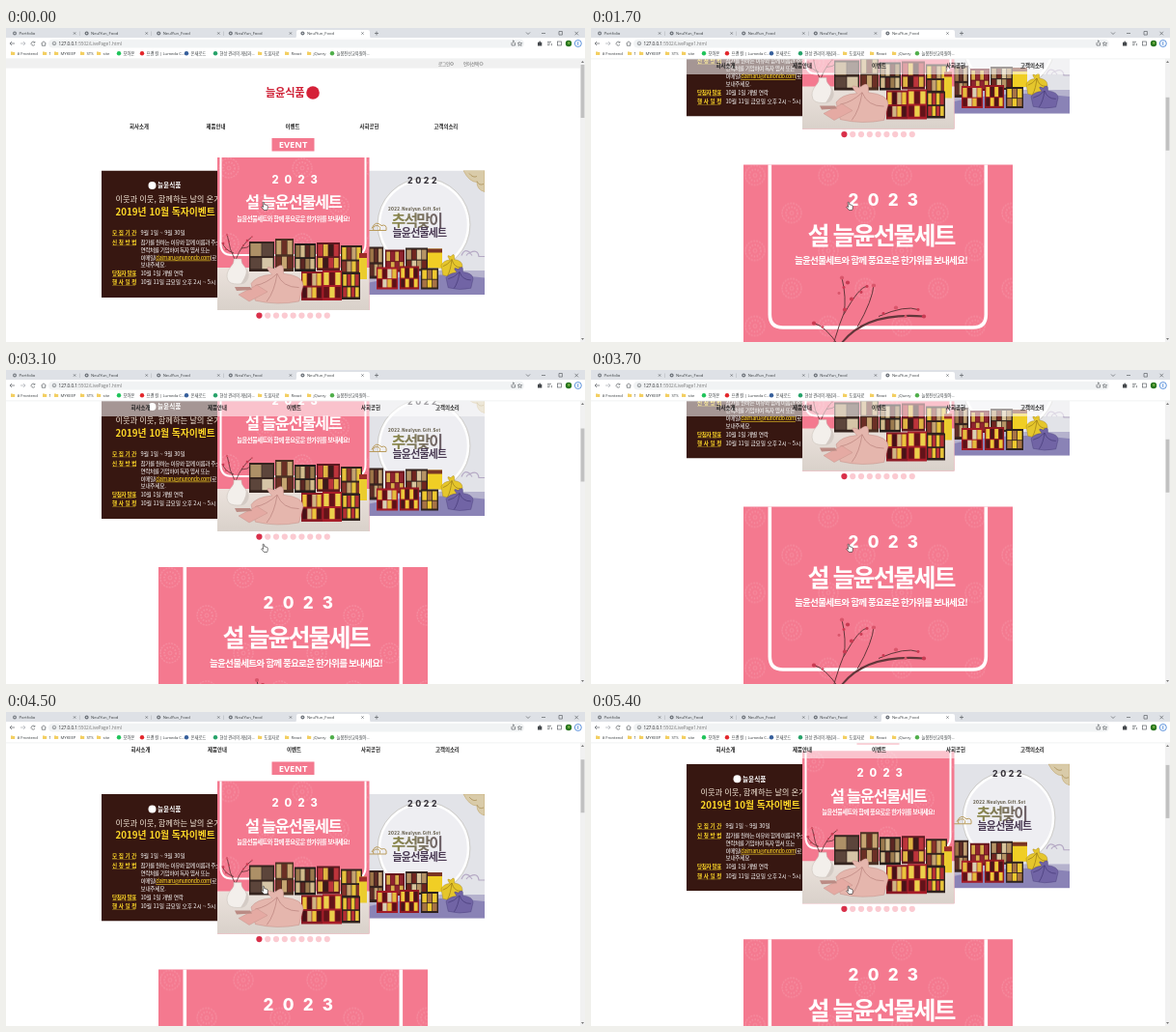
An HTML page for the animation above (5.5 s loop, 600x325 px).

```html
<!DOCTYPE html>
<html lang="ko">
<head>
<meta charset="utf-8">
<title>Event page scroll</title>
<style>
html, body { margin: 0; width: 100%; height: 100%; overflow: hidden; background: #fff; }
svg { display: block; }
text { font-family: "Noto Sans CJK KR", "Noto Sans CJK", "Noto Sans", sans-serif; white-space: pre; }
.ui { font-family: "Open Sans", "Noto Sans CJK KR", "Noto Sans CJK", sans-serif; }
.num { font-family: Inter, Roboto, sans-serif; font-weight: 800; }
</style>
</head>
<body>
<svg id="stage" width="600" height="325" viewBox="0 0 600 325"></svg>
<script>
const PINK = '#f4798f', BROWN = '#371711', GOLD = '#ffd928';

const rect = (x, y, w, h, fill, more = '') =>
  `<rect x="${x}" y="${y}" width="${w}" height="${h}" fill="${fill}" ${more}/>`;
const circ = (x, y, r, fill, more = '') =>
  `<circle cx="${x}" cy="${y}" r="${r}" fill="${fill}" ${more}/>`;
const path = (d, stroke, w = 1, fill = 'none', more = '') =>
  `<path d="${d}" stroke="${stroke}" stroke-width="${w}" fill="${fill}" ${more}/>`;
const group = (x, y, body, s = 1) =>
  `<g transform="translate(${x} ${y}) scale(${s})">${body}</g>`;
// y is the visual middle of the line
const text = (x, y, size, str, fill = '#222', more = '') =>
  `<text x="${x}" y="${y + size * 0.37}" font-size="${size}" fill="${fill}" ${more}>${str}</text>`;
const mid = 'text-anchor="middle"', bold = 'font-weight="700"';
const ls = n => `letter-spacing="${n}"`;
const list = (n, f) => Array.from({ length: n }, (_, i) => f(i)).join('');

const defs = `<defs>
  <pattern id="rosettes" width="76" height="78" patternUnits="userSpaceOnUse">
    ${[[50, 50], [12, 11]].map(([x, y]) =>
      circ(x, y, 10, 'none', 'stroke="#fff" stroke-width="1.4" stroke-dasharray="2 1"') +
      circ(x, y, 6, 'none', 'stroke="#fff" stroke-width="2" stroke-dasharray="1.5 1.5"') +
      circ(x, y, 2, 'none', 'stroke="#fff"')).join('')}
  </pattern>
  <linearGradient id="floor" x2="0" y2="1"><stop stop-color="#ebe2dc"/><stop offset="1" stop-color="#d9d1ca"/></linearGradient>
  <linearGradient id="olive" x2="1" y2="0"><stop stop-color="#8d8b4c"/><stop offset="1" stop-color="#6d6068"/></linearGradient>
  <clipPath id="leftClip"><rect width="120" height="131.5"/></clipPath>
  <clipPath id="rightClip"><rect width="120" height="128.5"/></clipPath>
</defs>`;

// Heading shared by both pink posters, centred on x = 0
const heading = () =>
  text(-34, 36.5, 17, '2023', '#fff', `class="num" ${ls(9.3)}`) +
  text(0, 73, 25, '설 늘윤선물세트', '#fff', `${mid} ${bold} ${ls(-2)}`) +
  text(0, 99, 9.6, '늘윤선물세트와 함께 풍요로운 한가위를 보내세요!', '#fff', `${mid} ${bold} ${ls(-0.8)}`);

const pinkBack = (w, h) => rect(0, 0, w, h, PINK) + rect(0, 0, w, h, 'url(#rosettes)', 'opacity=".13"');

// Upright gift box with a row of packs inside
const giftBox = (x, y, w, h, fill, n, packs) => rect(x, y, w, h, fill) +
  list(n, i => {
    const pw = (w - 2) / n;
    return rect(x + 1.3 + i * pw, y + 2, pw - 0.7, h * 0.42, packs[i % packs.length]) +
      rect(x + 1.3 + i * pw, y + h * 0.55, pw - 0.7, h * 0.36, packs[(i + 1) % packs.length]);
  });

const bundle = (x, y, w, h, fill, dark) => group(x, y,
  path(`M0 ${h * .5}Q${w * .1} ${h * .3} ${w * .4} ${h * .27}Q${w * .2} 0 ${w * .45} ${h * .13}
    Q${w * .65} ${-h * .1} ${w * .62} ${h * .25}Q${w} ${h * .3} ${w} ${h * .55}
    L${w * .92} ${h * .95}Q${w * .5} ${h * 1.06} ${w * .08} ${h * .93}Z`, dark, 0.4, fill) +
  path(`M${w * .5} ${h * .25}Q${w * .3} ${h * .5} ${w * .08} ${h * .55}M${w * .5} ${h * .25}
    Q${w * .6} ${h * .6} ${w * .92} ${h * .6}M${w * .5} ${h * .25}Q${w * .45} ${h * .7} ${w * .3} ${h * .95}`, dark, 0.7));

const blossoms = (spots, r) => spots.map(([x, y], i) =>
  circ(x, y, r * (i % 2 ? 0.7 : 1), i % 3 ? '#c93a52' : '#d9566b')).join('');

const leftBanner = () => {
  const rows = [
    [64, '모 집 기 간', '9월 1일 ~ 9월 30일', 0],
    [74, '신 청 방 법', '참가를 원하는 이유와 함께 이름과 주소', -0.45],
    [82.3, '', '연락처를 기입하여 독자 엽서 또는', -0.45],
    [90, '', `이메일(<tspan fill="${GOLD}" text-decoration="underline">dalmaru@nuriondo.com</tspan>)로`, -0.45],
    [97.5, '', '보내주세요.', -0.3],
    [106.5, '당첨자 발표', '10월 1일 개별 연락', -0.1],
    [115.8, '행 사 일 정', '10월 11일 금요일 오후 2시 ~ 5시', -0.05]
  ];
  return `<g clip-path="url(#leftClip)">` + rect(0, 0, 120, 131.5, BROWN) +
    circ(52.5, 15.5, 4, '#fff') + text(58, 15.5, 6.6, '늘윤식품', '#fff', bold) +
    text(14.5, 29.5, 8.3, '이웃과 이웃, 함께하는 날의 온기', '#f3e6d6', ls(-0.1)) +
    text(14.5, 42.8, 9.8, '2019년 10월 독자이벤트', GOLD, bold) +
    rows.map(([y, label, value, gap]) =>
      text(11, y, 5.6, label, GOLD, `${bold} ${ls(label[1] === ' ' ? 0 : -0.4)}`) +
      (label ? rect(11, y + 3.2, 24, 0.5, '#a8861c') : '') +
      text(40.5, y, 5.7, value, '#fff', ls(gap))).join('') + '</g>';
};

const rightBanner = () => `<g clip-path="url(#rightClip)">` +
  rect(0, 0, 120, 128.5, '#e2e3e8') +
  circ(57, 56, 46, '#eeeef2', 'stroke="#fff" stroke-width="2.5"') +
  circ(57, 56, 48, 'none', 'stroke="#b9b4a8" stroke-width=".5"') +
  path('M98 0H120V22Q112 20 112 12Q104 12 98 0Z', '#c2a66a', 0.6, '#d9cba9') +
  path('M104 3q4 5 8 3m0 5q2 5 7 3', '#a58a50', 0.7) +
  path('M3 60q4-9 10-3q6-2 5 5H0m5 0q-2-5 4-5q4 1 2 5', '#b99b5c', 1) +
  path('M96 88q3-8 9-3q8-4 9 4h6M101 88q3-5 6 0', '#b5a9c4', 1.2) +
  rect(0, 104, 120, 25, '#8a83b6') +
  path('M0 104H120V111Q60 103 0 116Z', 'none', 0, '#b5b2cd') +
  text(40, 10, 8.7, '2022', '#37333b', `class="num" ${ls(2.6)}`) +
  text(20, 40, 4.2, '2022.Neulyun.Gift.Set', '#67604f', `class="num" ${ls(0.35)}`) +
  text(23.5, 51.5, 16, '추석맞이', 'url(#olive)', `${bold} ${ls(-1.8)}`) +
  text(24.5, 64.5, 11, '늘윤선물세트', '#4b3b54', `${bold} ${ls(-0.8)}`) +
  giftBox(0, 79, 15, 33, '#36231f', 3, ['#9d7547', '#5f2d26', '#c2a173']) +
  giftBox(17, 82, 20, 23, '#67151c', 4, ['#d7ae4b', '#8f2430']) +
  giftBox(38, 80, 23, 24, '#332521', 4, ['#b69465', '#70251f', '#d8c59d']) +
  rect(61, 81, 15, 20, '#f0ce25') + rect(61, 81, 15, 4, '#7b3524') +
  giftBox(8, 100, 22, 23, '#a31b27', 4, ['#e4bc3e', '#5c1117', '#d8d0b3']) +
  giftBox(32, 99, 20, 24, '#921923', 4, ['#edc839', '#4a1518']) +
  giftBox(54, 101, 18, 22, '#2d211e', 3, ['#efc82f', '#a77345']) +
  bundle(75, 86, 22, 24, '#e5c62c', '#9a7a17') +
  bundle(80, 99, 28, 24, '#7164a5', '#463a78') + '</g>';

const centerPoster = () => pinkBack(157.5, 158) +
  path('M3.5 0V89Q3.5 101 15 101H142Q153.5 101 153.5 89V0', '#fff', 2) +
  group(78.7, -1.5, heading(), 0.655) +
  rect(0, 114, 157.5, 44, 'url(#floor)') +
  path('M20 110Q12 95 10 79M19 106Q25 90 36 82M17 99Q8 96 5 88M25 94Q32 94 35 90', '#5e3134', 0.8) +
  blossoms([[10, 80], [12, 87], [6, 89], [36, 82], [31, 86], [27, 91], [35, 90], [9, 95]], 1.3) +
  path('M17 105H25Q24 109 29 114Q35 121 30 128Q28 131 21 131Q13 131 11 127Q8 120 14 113Q18 109 17 105Z', '#c5bcb5', 0.5, '#f3efeb') +
  path('M24 131Q32 120 29 114Q35 121 30 128Q28 131 24 131Z', 'none', 0, '#d4cbc5') +
  giftBox(33, 87, 26, 31, '#35241f', 2, ['#ad9067', '#5c453b', '#d6c5a7']) +
  giftBox(60, 84, 19, 34, '#4a3023', 3, ['#c6a571', '#6b2f25']) +
  giftBox(80, 89, 22, 29, '#231c1b', 4, ['#9b7a4e', '#d2bb8c', '#5b2622']) +
  giftBox(103, 88, 24, 29, '#5d1920', 4, ['#bc343b', '#dfb542', '#3b1a19']) +
  giftBox(128, 91, 22, 30, '#32231e', 4, ['#e7c23b', '#88342b', '#c4a271']) +
  rect(147, 99, 8, 27, '#ebcc2e') + rect(147, 99, 8, 5, '#9d2d28') +
  giftBox(87, 118, 22, 30, '#8c1a25', 4, ['#ebc43c', '#471217', '#cfb483']) +
  giftBox(109, 117, 20, 31, '#a71d29', 3, ['#ecd04b', '#631319']) +
  giftBox(129, 119, 19, 28, '#2f211e', 4, ['#e7c438', '#b53034']) +
  bundle(35, 110, 54, 41, '#e5b6ad', '#b9837d') +
  path('M22 142L41 132L52 139L33 149Z', '#c08f87', 0.4, '#e5aaa3') +
  path('M18 134L34 134L36 137L20 138Z', 'none', 0, '#bb8b84');

const detailPoster = () => pinkBack(279, 300) +
  path('M27.3 0V155Q27.3 168.5 41 168.5H238Q251.3 168.5 251.3 155V0', '#fff', 3.6) +
  group(142.5, 0, heading()) +
  path('M64 300Q70 240 100 187Q125 152 187 157', '#62363a', 2) +
  path('M86 215Q95 175 104 154Q107 138 102 117M99 188Q85 167 73 164M104 155Q120 126 128 126' +
    'M118 168Q134 140 135 124M140 157Q168 145 181 150M91 204Q112 180 152 190M80 235Q60 205 56 190', '#62363a', 1) +
  blossoms([[102, 117], [104, 127], [108, 122], [99, 133], [112, 139], [128, 126], [135, 125], [122, 132],
    [73, 164], [82, 168], [105, 150], [145, 154], [158, 148], [181, 150], [187, 157], [168, 157],
    [136, 187], [152, 190], [56, 190], [64, 206]], 2.1);

const nav = () => [[128, '회사소개'], [207.5, '제품안내'], [289.5, '이벤트'], [366.5, '사회공헌'], [443.5, '고객의소리']]
  .map(([x, s]) => text(x, 102, 5.4, s, '#222', bold)).join('');

const page = () =>
  rect(0, 32, 595, 9.6, '#f0f0f0') +
  text(448, 37, 4.4, '로그인', '#666') + circ(462, 37, 1.5, 'none', 'stroke="#777" stroke-width=".6"') +
  text(474, 37, 4.4, '언어선택', '#666') + circ(492.5, 37, 1.6, 'none', 'stroke="#777" stroke-width=".6"') +
  text(269, 67, 11.2, '늘윤식품', '#cf2036', `${bold} ${ls(-0.2)}`) + circ(318, 67, 6.8, '#d52138') +
  rect(275.5, 114, 44, 13.5, PINK) + text(297.5, 120.8, 9.4, 'EVENT', '#fff', `${mid} ${bold} class="ui"`) +
  group(99, 147.5, leftBanner()) + group(376, 147.5, rightBanner()) + group(219, 134, centerPoster()) +
  list(9, i => circ(262.4 + i * 8.8, 297.6, 3.1, i ? '#fbcad1' : '#d9304a')) +
  group(158, 329, detailPoster());

const folder = (x, y) => path(`M${x - 2} ${y - 1.8}h1.6l.6.7h2v3h-4.2z`, 'none', 0, '#f3cf62');

const browser = () => {
  const tabs = ['Portfolio', ...Array(4).fill('NeulYun_Food')];
  const marks = [
    [7, '# Frontend'], [40, '1'], [52, 'MYKEEP'], [79, 'STS'], [96, 'site'],
    [117, '모아본', '#1fc45a'], [141, '프랜 컬 | Lumeda C...', '#e3262b'], [187, '온새로드', '#365f9b'],
    [217, '현상 관리의 개념과...', '#26a269'], [263, '도움자료'], [291, 'React'], [314, 'jQuery'],
    [338, '늘봄전산교육원아...', '#4fae4a']
  ];
  const icon = (d, color = '#5f6368') => path(d, color, 0.7);
  return rect(0, 0, 600, 10.5, '#dee1e6') + rect(0, 10.2, 600, 22, '#fff') +
    path('M299 10.5Q301 10.5 301 8V4Q301 2 303 2H375Q377 2 377 4V8Q377 10.5 379 10.5Z', 'none', 0, '#fff') +
    tabs.map((s, i) => {
      const x = 3 + i * 74.6;
      return circ(x + 6, 5.5, 2, i ? '#6b7077' : '#777c83') + circ(x + 6, 5.5, 0.8, '#dfe2e6') +
        text(x + 10.5, 5.5, 4.2, s, '#3c4043', 'class="ui"') +
        icon(`M${x + 67} 4.4l2.2 2.2m0-2.2l-2.2 2.2`) +
        (i < 3 ? rect(x + 73, 3.5, 0.4, 4.5, '#a1a5aa') : '');
    }).join('') +
    icon('M382 5.5h4m-2-2v4M539 4.5l2 2l2-2M555 5.5h4M573 3.5h3.4v3.6h-3.4zM589.5 3.8l3.5 3.5m0-3.5l-3.5 3.5') +
    icon('M9 16H4m2-2l-2 2l2 2M29.6 14.8a2 2 0 1 0 .3 2.2m0-3v1.2h-1.4M36.5 16l2.5-2.2l2.5 2.2m-4.2-.5v2.8h3.4v-2.8') +
    icon('M15 16h5m-2-2l2 2l-2 2', '#aaaeb3') +
    rect(44, 11.7, 493, 8.8, '#f1f3f4', 'rx="4.4"') +
    circ(50, 16, 1.8, 'none', 'stroke="#5f6368" stroke-width=".6"') + rect(49.7, 15.7, 0.6, 1.4, '#5f6368') +
    text(54.5, 16.1, 4.6, '127.0.0.1<tspan fill="#777">:5502/LivePage1.html</tspan>', '#202124', 'class="ui"') +
    icon('M524 15v3h3.5v-3m-1.7 1v-3m-1 .8l1-.9l1 .9M532 14.4l1.2 1.2h1.5l-1 1.1l.3 1.6l-1.6-.8l-1.4.8l.3-1.6l-1-1.1h1.4z') +
    path('M551 14.8h1.6q-.4-1.3.6-1.3t.6 1.3h1.5v3.8H551z', 'none', 0, '#44484c') +
    icon('M561 14.3h4m-4 1.7h3m-3 1.7h2.4m2-1.8v2.4') + rect(571.5, 14, 4, 4, 'none', 'stroke="#5f6368" stroke-width=".7"') +
    circ(583, 16, 3.2, '#28751f') + circ(583.2, 15.5, 1.2, '#79b545') +
    circ(592.8, 16, 3.5, '#fff', 'stroke="#3478d4" stroke-width=".8"') + rect(592.4, 14.2, 0.8, 3.6, '#3478d4') +
    marks.map(([x, s, color]) => (color ? circ(x, 26.2, 2.2, color) : folder(x, 26.2)) +
      text(x + 4.6, 26.2, 4.3, s, '#3c4043', `class="ui" ${ls(-0.1)}`)).join('') +
    rect(0, 31.7, 600, 0.5, '#e2e3e5');
};

const scrollbar = () => rect(595, 32, 5, 293, '#f1f1f1') +
  path('M596 36L597.5 34L599 36Z', 'none', 0, '#777') + path('M596 321L597.5 323L599 321Z', 'none', 0, '#777') +
  rect(595.6, 38, 3.8, 55, '#c1c1c1', 'id="thumb"');

const hand = path('M0 0q1-1 1.4.3l.5 2.2q1.5-.5 2 .4q1.3-.1 1.4 1.5l-.2 2.3l-.6 1.3h-3.1l-2.7-3.2q0-1.2 1.9.1z',
  '#222', 0.6, '#fff');

document.getElementById('stage').innerHTML = defs + rect(0, 0, 600, 325, '#fff') +
  `<svg x="0" y="32" width="595" height="293" viewBox="0 32 595 293">
    <g id="page">${page()}</g>
    <rect id="bar" y="32" width="595" height="16" fill="#fff" opacity=".55"/>
    <g id="nav">${nav()}</g>
  </svg>` + scrollbar() + browser() + group(266, 180.5, hand);

// Wheel position in notches over time, in tenths of a second
const LOOP = 5500, NOTCH = 31.25, STICK = 2 * NOTCH;
const wheel = [[0, 0], [10, 0], [12, 1], [17, 6], [18, 6], [24, 0], [27, 0], [31, 4], [34, 7],
  [36, 7], [37, 6], [42, 0], [43, 0], [45, 2], [49, 6], [51, 6], [54, 3]];

function scrollAt(ms) {
  const t = Math.floor(ms / 100);
  const i = Math.max(1, wheel.findIndex(k => k[0] >= t));
  const [t0, a] = wheel[i - 1], [t1, b] = wheel[i];
  return Math.round(a + (b - a) * (t - t0) / (t1 - t0)) * NOTCH;
}

const el = id => document.getElementById(id);
const parts = { page: el('page'), nav: el('nav'), bar: el('bar'), thumb: el('thumb') };
const start = performance.now();

function draw(now) {
  const y = scrollAt(Math.max(0, now - start) % LOOP);
  const stuck = y >= STICK;
  parts.page.setAttribute('transform', `translate(0 ${-y})`);
  parts.nav.setAttribute('transform', `translate(${stuck ? 1.5 : 0} ${-Math.min(y, STICK)})`);
  parts.bar.setAttribute('visibility', stuck ? 'visible' : 'hidden');
  parts.thumb.setAttribute('y', 38 + y * 0.18);
  requestAnimationFrame(draw);
}
draw(start);
</script>
</body>
</html>
```
